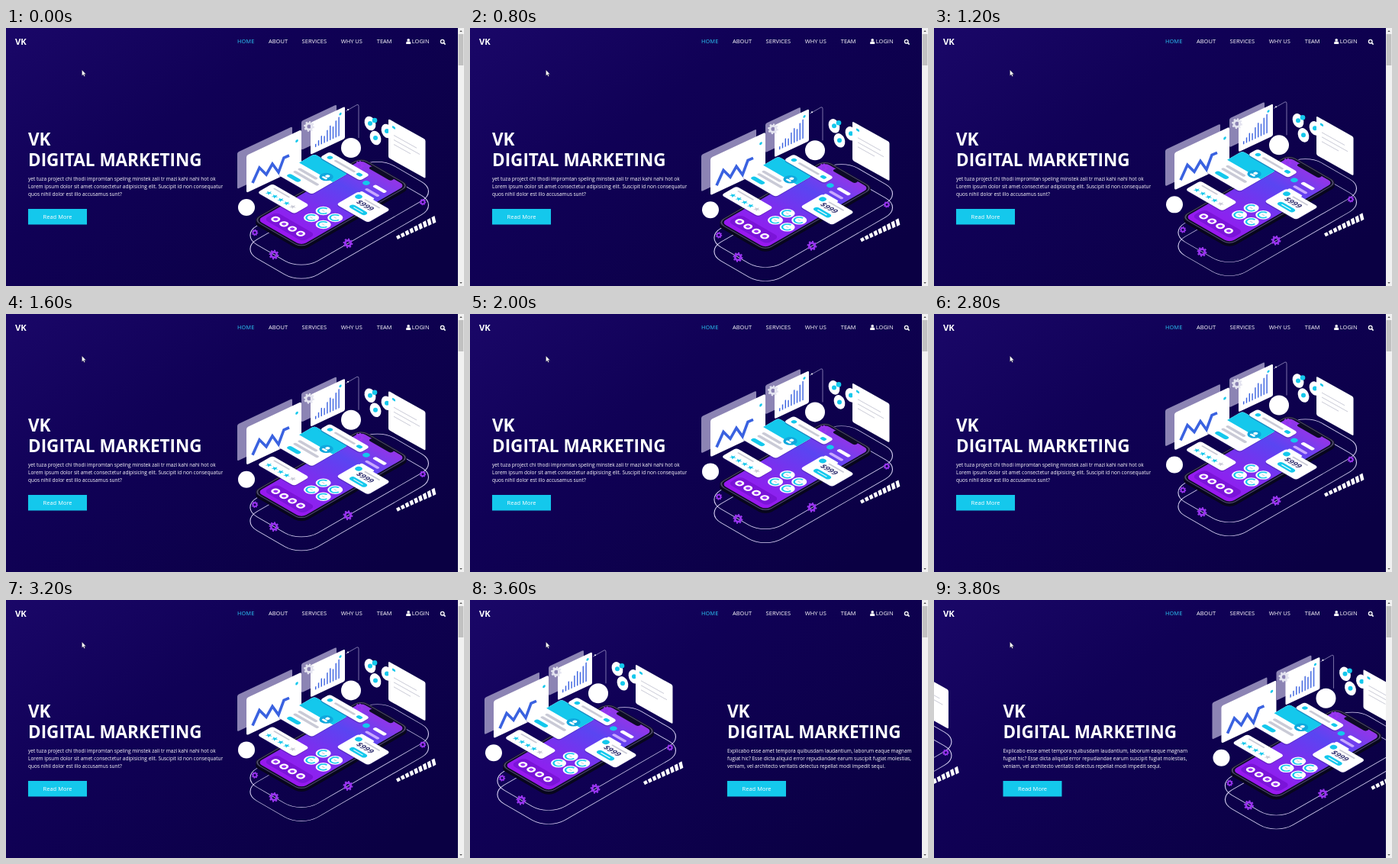
Animation of 600x338 px, one loop 4000 ms. Source, as an HTML page:

```html
<!DOCTYPE html>
<html lang="en">
<head>
<meta charset="utf-8">
<title>Digital marketing</title>
<style>
html, body { margin: 0; width: 100%; height: 100%; overflow: hidden; background: #0c004c; }
svg { display: block; width: 600px; height: 338px; font-family: "Open Sans", sans-serif; fill: #fff; }
.title { font-weight: 700; font-size: 22.5px; }
.copy { font-size: 6.56px; }
.link { font-size: 7.5px; }
</style>
</head>
<body>
<svg viewBox="0 0 600 338">
  <defs>
    <linearGradient id="sky" x2="1" y2=".75">
      <stop stop-color="#1a0768"/><stop offset=".4" stop-color="#100156"/><stop offset="1" stop-color="#0a0043"/>
    </linearGradient>
    <linearGradient id="screen" x2="0" y2="1">
      <stop stop-color="#9435e8"/><stop offset=".3" stop-color="#5a45f2"/><stop offset=".6" stop-color="#7a30ee"/><stop offset="1" stop-color="#9a17f0"/>
    </linearGradient>
    <g id="art"></g>
  </defs>
  <rect width="600" height="338" fill="url(#sky)"/>
  <g id="old"></g>
  <g id="next"></g>
  <g id="nav">
    <text x="12" y="22" font-size="11.25" font-weight="700">VK</text>
    <circle cx="527.2" cy="15.8" r="1.8"/>
    <path d="M524.2 21v-1.6q0-2 1.6-2h2.8q1.6 0 1.6 2V21z"/>
    <circle cx="571.7" cy="17.7" r="2.3" fill="none" stroke="#fff" stroke-width="1.3"/>
    <path d="M573.4 19.4l2.2 2.2" stroke="#fff" stroke-width="1.5"/>
  </g>
  <path d="M99.5 55v7.4l1.7-1.5 1.2 2.6 1.2-.5-1.2-2.6h2.3z" stroke="#222" stroke-width=".3"/>
  <rect x="592" width="8" height="338" fill="#f1f1f1"/>
  <rect x="592.7" y="8" width="6.6" height="41" fill="#c1c1c1"/>
  <path d="M594.3 5l1.7-2 1.7 2zM594.3 333l1.7 2 1.7-2z" fill="#555"/>
</svg>
<script>
const $ = id => document.getElementById(id);
const CYAN = '#14c8ec', BLUE = '#3a62e0', VIOLET = '#9a35f0', GREY = '#c9cad6';

const rect = (x, y, w, h, fill = '#fff', rx = 0) =>
  `<rect x="${x}" y="${y}" width="${w}" height="${h}" rx="${rx}" fill="${fill}"/>`;
const dot = (x, y, r, fill = '#fff') => `<circle cx="${x}" cy="${y}" r="${r}" fill="${fill}"/>`;
const line = (d, color, w = 1) =>
  `<path d="${d}" fill="none" stroke="${color}" stroke-width="${w}"/>`;
const text = (x, y, s, attrs) => `<text x="${x}" y="${y}" ${attrs}>${s}</text>`;
const repeat = (n, f) => Array.from({ length: n }, (_, i) => f(i)).join('');
const plane = (m, x, y, body) => `<g transform="matrix(${m} ${x} ${y})">${body}</g>`;
const floor = (x, y, body) => plane('.866 .5 -.866 .5', x, y, body);
const wall = (x, y, body) => plane('1 -.47 0 1', x, y, body);
const gear = (x, y, r, c) =>
  `<g fill="none" stroke="${c}"><circle cx="${x}" cy="${y}" r="${r * .62}" stroke-width="${r * .45}"/>
   <circle cx="${x}" cy="${y}" r="${r * .9}" pathLength="16" stroke-dasharray="1" stroke-width="${r * .35}"/></g>`;
const card = (x, y, w, h, body) => floor(x, y,
  rect(1, 1.5, w, h, '#25107055', 4) + rect(0, 0, w, h, '#fff', 4) + body);

function charts() {
  const heights = [4, 7, 11, 9, 15, 19, 16, 22, 25];
  return wall(303, 163, rect(0, 0, 72, 48, '#8c84b4', 2))
    + wall(315, 167, rect(0, 0, 72, 49, '#fff', 2.5) + dot(66, 12, 1.8, CYAN))
    + line('M323 203l9-20 9 9 8-14 8 11 7-19 7-3', BLUE, 3.6)
    + wall(387, 122, rect(0, 0, 46, 38, '#8c84b4', 2))
    + wall(399, 124, rect(0, 0, 45, 42, '#fff', 2)
      + repeat(9, i => rect(6 + i * 3.8, 35 - heights[i], 1.4, heights[i], BLUE)) + dot(39, 7, 1.6, CYAN))
    + gear(397, 129, 6.5, '#e4e4f0')
    + line('M445 109l15-8.5q2-.5 2 2V144', '#a9a3cf', .7) + dot(448, 107, 1);
}

function messages() {
  const bubble = (x, y) => `<ellipse cx="${x}" cy="${y}" rx="7" ry="9.6" transform="rotate(-22 ${x} ${y})"/>`
    + dot(x, y, 3, CYAN);
  return bubble(477, 125) + bubble(499, 135) + bubble(484, 144) + dot(483, 121, 3.3, CYAN) + dot(505, 130, 2.6, CYAN)
    + plane('1 .56 0 1', 501, 119, rect(0, 0, 48.5, 51, '#fff', 2)
      + repeat(3, i => rect(7, 17 + i * 6, [30, 34, 22][i], 1, GREY)) + rect(5, 6, 4, 3, CYAN, 1));
}

function phone() {
  const ring = (x, y) => dot(x, y, 8.2)
    + `<circle cx="${x}" cy="${y}" r="5.4" fill="none" stroke="${CYAN}" stroke-width="2" stroke-dasharray="25 9"/>`
    + rect(x - 2, y - .6, 4, 1.2, GREY);
  return floor(465, 172.5, rect(0, 0, 75, 165, '#07061c', 10))
    + floor(465, 169, rect(0, 0, 75, 165, '#12102e', 10)
      + rect(1, 1, 73, 163, '#55516f', 9) + rect(2, 2, 71, 161, '#0d0b26', 9)
      + rect(4, 4, 67, 157, 'url(#screen)', 7) + rect(20, 3, 34, 6, '#0d0b26', 3)
      + rect(47, 25, 18, 5, '#fff', 2) + rect(45, 36, 20, 4, '#c9a9ff', 2) + rect(45, 44, 20, 4, '#fff', 2)
      + dot(38, 30, 4, CYAN) + rect(8, 136, 59, 19, '#7a14d8', 6)
      + repeat(4, i => dot(17 + i * 12.6, 146, 4.9) + dot(17 + i * 12.6, 146, 2.4, VIOLET))
      + repeat(4, i => ring(42 + (i % 2) * 18, 99 + (i >> 1) * 18)));
}

function cards() {
  return card(404, 165, 51, 55,
      `<path d="M4 0H47q4 0 4 4V23H0V4q0-4 4-4z" fill="${CYAN}"/>`
      + dot(39, 21, 7.5, '#0fa8dd') + dot(39, 19, 2.4) + rect(35.5, 22, 7, 3, '#fff', 1.5)
      + rect(7, 29, 28, 4, GREY, 2) + rect(7, 36, 37, 4, GREY, 2) + rect(7, 44, 18, 6, CYAN, 3))
    + card(349, 204, 56, 23,
      rect(7, 4, 24, 2, GREY, 1)
      + repeat(5, i => text(5 + i * 9, 18, '★', `font-size="10" fill="${i < 4 ? CYAN : GREY}" font-family="DejaVu Sans, sans-serif"`)))
    + card(462, 214, 48, 34,
      text(12, 17, '$999', 'font-size="10" font-weight="700" fill="#3c3c78"')
      + dot(7, 7, 4, CYAN) + rect(15, 5, 23, 2, GREY, 1) + rect(12, 21, 24, 7, CYAN, 3.5)
      + rect(17, 24, 14, 1.2))
    + card(424, 162, 61, 15, dot(8, 7.5, 3, CYAN) + rect(15, 6, 31, 3, GREY, 1.5) + rect(49, 5, 7, 5, CYAN, 2));
}

function tracks() {
  const loop = y => floor(486.5, y, `<rect width="92" height="207" rx="25" fill="none" stroke="#d8d2f4" stroke-width=".9"/>`);
  return loop(186) + loop(168)
    + [[326, 268], [351, 297], [448, 282], [546, 228]].map(([x, y], i) => gear(x, y, i % 3 ? 6 : 4, VIOLET)).join('');
}

const stripes = repeat(9, i => {
  const h = 4 + i * .55;
  return `<path d="M${511 + i * 5.8} ${273 - i * 3.1}l4-2.2 2 ${h}-4 2.2z"/>`;
});

// The two brand marks are plain discs.
$('art').innerHTML = tracks() + charts() + messages() + phone() + gear(463, 180, 5.5, VIOLET) + cards()
  + dot(452, 157, 13) + dot(315, 235, 11) + stripes;

const slide = lines => text(29, 154, 'VK', 'class="title"') + text(29, 181, 'DIGITAL MARKETING', 'class="title"')
  + lines.map((s, i) => text(29, 200.2 + i * 9.84, s, 'class="copy"')).join('')
  + rect(29, 237, 77, 20.5, CYAN) + text(48.6, 250, 'Read More', 'class="link"')
  + '<use href="#art"/>';

$('old').innerHTML = slide([
  'yet tuza project chi thodi impromtan speling minstek zali tr mazi kahi nahi hot ok',
  'Lorem ipsum dolor sit amet consectetur adipisicing elit. Suscipit id non consequatur',
  'quos nihil dolor est illo accusamus sunt?']);
$('next').innerHTML = slide([
  'Explicabo esse amet tempora quibusdam laudantium, laborum eaque magnam',
  'fugiat hic? Esse dicta aliquid error repudiandae earum suscipit fugiat molestias,',
  'veniam, vel architecto veritatis delectus repellat modi impedit sequi.']);
$('nav').innerHTML += [[303, 'HOME'], [344, 'ABOUT'], [387.6, 'SERVICES'], [438.7, 'WHY US'], [485.8, 'TEAM'], [531.8, 'LOGIN']]
  .map(([x, s], i) => text(x, 20.4, s, `class="link" fill="${i ? '#fff' : '#2cc4f2'}"`)).join('');

// cubic-bezier(.25, .1, .25, 1)
function ease(x) {
  if (x <= 0 || x >= 1) return x <= 0 ? 0 : 1;
  const curve = (a, b, u) => 3 * a * u * (1 - u) ** 2 + 3 * b * u * u * (1 - u) + u ** 3;
  let lo = 0, hi = 1;
  for (let i = 0; i < 24; i++) {
    const mid = (lo + hi) / 2;
    if (curve(.25, .25, mid) < x) lo = mid; else hi = mid;
  }
  return curve(.1, 1, lo);
}

const LOOP = 4000, STEP = 200, PAGE = 592;
function bob(t) {
  const p = (t + 4150) / 2500, k = ease(p % 1);
  return 42 * (Math.floor(p) % 2 ? k : 1 - k);
}

function draw(now) {
  const t = Math.floor((now % LOOP) / STEP) * STEP;
  const x = -PAGE * ease((t - 3430) / 600);
  $('art').setAttribute('transform', `translate(0 ${bob(t) - bob(0)})`);
  $('old').setAttribute('transform', `translate(${x} 0)`);
  $('next').setAttribute('transform', `translate(${x + PAGE} 0)`);
  requestAnimationFrame(loop);
}
const start = performance.now();
const loop = () => draw(performance.now() - start);
loop();
</script>
</body>
</html>
```
